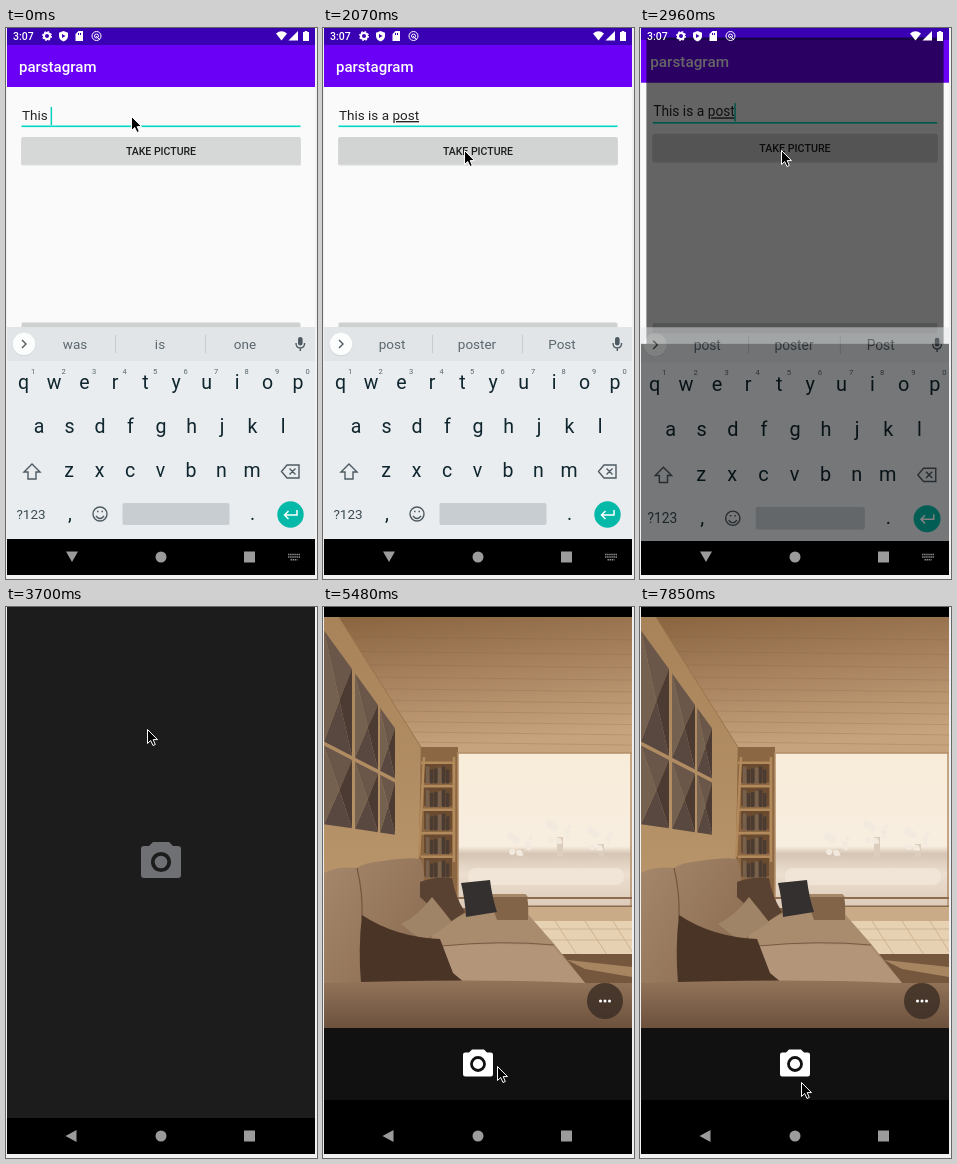
An HTML page that plays this animation: 311x551 px, repeating every 8 s.

```html
<!DOCTYPE html>
<html lang="en">
<head>
<meta charset="utf-8">
<title>Post with a picture</title>
<style>
html, body { margin: 0; width: 100%; height: 100%; overflow: hidden; background: #f1f1f1; }
svg { display: block; width: 311px; height: 551px; }
text { font-family: Roboto, "Noto Sans", sans-serif; white-space: pre; }
.mid { text-anchor: middle; }
.bold { font-weight: 500; }
.key { font-size: 19.5px; fill: #10262e; }
.hint { font-size: 7.5px; fill: #59656c; }
.word { font-size: 13.5px; fill: #5b676e; }
.line { fill: none; stroke: #4e5a61; stroke-width: 1.4; }
#typing { text-decoration: underline; }
</style>
</head>
<body>
<svg viewBox="0 0 311 551">
<defs>
  <clipPath id="screen"><rect x="1" width="308" height="547"/></clipPath>
  <clipPath id="view"><rect x="1" y="10" width="308" height="411"/></clipPath>
  <linearGradient id="ceil" x1="0" y1="0" x2=".25" y2="1">
    <stop offset="0" stop-color="#89643f"/><stop offset=".5" stop-color="#a98360"/><stop offset="1" stop-color="#c6a37c"/>
  </linearGradient>
  <linearGradient id="wall" x2="0" y2="1">
    <stop offset="0" stop-color="#a8835a"/><stop offset="1" stop-color="#b8946b"/>
  </linearGradient>
  <linearGradient id="glass" x2="0" y2="1">
    <stop offset="0" stop-color="#f8ecd9"/><stop offset=".6" stop-color="#f8eee0"/>
    <stop offset=".65" stop-color="#d6c5b4"/><stop offset=".78" stop-color="#ecdfd0"/><stop offset="1" stop-color="#dccab8"/>
  </linearGradient>
  <linearGradient id="back" x2="1" y2=".6">
    <stop offset="0" stop-color="#a5876b"/><stop offset="1" stop-color="#8a6b51"/>
  </linearGradient>
  <linearGradient id="front" x2="0" y2="1">
    <stop offset="0" stop-color="#927459"/><stop offset="1" stop-color="#6c513d"/>
  </linearGradient>
  <path id="cam" d="M12 0H28L32 4H37Q40 4 40 7V33Q40 36 37 36H3Q0 36 0 33V7Q0 4 3 4H8Z"/>
</defs>
<g clip-path="url(#screen)">
  <rect width="311" height="547" fill="#000"/>
  <g id="phone">
    <g id="app">
      <rect x="-5" y="-5" width="321" height="320" fill="#fafafa"/>
      <rect x="-5" y="-5" width="321" height="64" fill="#6a00f6"/>
      <rect x="-5" y="-5" width="321" height="22" fill="#3a00b3"/>
      <text class="bold" x="13" y="44" font-size="15" fill="#fff">parstagram</text>
      <text x="16" y="92" font-size="13.5" fill="#242424" id="field"><tspan id="typed"></tspan><tspan id="typing"></tspan></text>
      <rect id="caret" y="79" width="1.5" height="18" fill="#03d0bd"/>
      <rect x="15.500" y="97.500" width="279" height="1.600" fill="#03d8c4"/>
      <rect x="15" y="109.500" width="280" height="28" rx="2" fill="#000" opacity=".13"/>
      <rect x="15.500" y="109" width="279" height="27" rx="1.500" fill="#d6d7d7"/>
      <rect id="press" x="15.500" y="109" width="279" height="27" rx="1.500"/>
      <text class="mid bold" x="155" y="126.700" font-size="10.5" fill="#1d1d1d">TAKE PICTURE</text>
      <rect x="15.500" y="294.500" width="279" height="10" rx="1.500" fill="#cfd0d0"/>
    </g>
    <g id="opening"><rect x="1" width="308" height="547" id="cover"/></g>
    <g id="board">
      <rect x="-5" y="299" width="321" height="212" fill="#e9edf0"/>
      <rect x="-5" y="299" width="321" height="34" fill="#e1e5e8"/>
      <circle cx="18" cy="316.500" r="11.500" fill="#c9cfd3"/>
      <circle cx="18" cy="316" r="11.300" fill="#fcfdfd"/>
      <path class="line" d="M16 312l4 4-4 4"/>
      <path d="M109.500 307v18M199.500 307v18" stroke="#c5cbcf"/>
      <g id="words"></g>
      <rect x="292" y="309" width="4.600" height="8.600" rx="2.300" fill="#4e5a61"/>
      <path class="line" d="M290 315q0 5 4.300 5t4.300-5M294.300 320v3"/>
      <g id="keys"></g>
      <path class="line" d="M26 436l-8 8h4v7h8v-7h4z"/>
      <path class="line" d="M281 437h12v13h-12l-5.500-6.500zM283.500 440.500l6 6M289.500 440.500l-6 6"/>
      <text class="mid" x="25" y="491" font-size="13.5" fill="#3c4a52">?123</text>
      <g class="line"><circle cx="94" cy="486" r="7"/><path d="M90 488q4 5 8 0M91 483.500h1.500M95.500 483.500h1.500"/></g>
      <rect x="116.500" y="475" width="107" height="22" rx="2" fill="#c8cdd1"/>
      <circle cx="284.500" cy="486.500" r="13.200" fill="#04b9a8"/>
      <path d="M291 482v5h-12M282.500 483l-4 4 4 4" fill="none" stroke="#fff" stroke-width="1.500"/>
    </g>
  </g>
  <g id="status" fill="#fff">
    <text class="bold" x="7" y="12" font-size="10.5">3:07</text>
    <circle cx="41" cy="8" r="3" fill="none" stroke="#fff" stroke-width="2"/>
    <circle cx="41" cy="8" r="4.300" fill="none" stroke="#fff" stroke-width="1.300" stroke-dasharray="1.700 1.677"/>
    <path d="M57.500 3l4.500 1.700v3.300q0 3.600-4.500 5.500q-4.500-1.900-4.500-5.500v-3.300z"/>
    <path d="M56 6l3.500 2-3.500 2z" fill="#3a00b3"/>
    <path d="M72.500 3h4.500v10h-7.500v-7z"/>
    <path d="M72.500 5v2M74.500 5v2" stroke="#3a00b3"/>
    <circle cx="90.500" cy="8" r="4.500" fill="none" stroke="#fff"/>
    <circle cx="90.500" cy="8" r="2" fill="none" stroke="#fff"/><path d="M90 8l4 4" stroke="#fff"/>
    <path d="M270 5.500q5.500-4.500 11 0l-5.500 7z"/><path d="M292 3v9.500h-9.500z"/>
    <path d="M297 4h1.700v-1h2.600v1h1.700v9h-6z"/>
  </g>

  <g id="loading" opacity="0">
    <rect width="311" height="511" fill="#1c1c1c"/>
    <g id="badge">
      <use href="#cam" x="135" y="235" fill="#6f7073"/>
      <circle cx="155" cy="255" r="8.200" fill="none" stroke="#1c1c1c" stroke-width="3.800"/>
    </g>
  </g>

  <g id="camera" opacity="0">
    <rect width="311" height="511"/>
    <g clip-path="url(#view)" id="photo">
      <rect y="10" width="311" height="411" fill="#8b6a4c"/>
      <path d="M16 10H309V146H133L98 140Z" fill="url(#ceil)"/>
      <g id="planks" stroke="#7d5a3a" stroke-opacity=".22"></g>
      <path d="M1 10H16L98 140V275H1Z" fill="url(#wall)"/>
      <path d="M16 10L98 140V252" fill="none" stroke="#8d693f" stroke-opacity=".5"/>
      <g id="panels"></g>
      <path d="M98 140H135V290H95Z" fill="#8c6743"/>
      <g id="shelf"></g>
      <rect x="135" y="146" width="174" height="155" fill="url(#glass)"/>
      <path d="M135 300V146H309M308 146v154" fill="none" stroke="#b28f69" stroke-width="1.500"/>
      <g id="trees" fill="#f3eadf"></g>
      <rect x="145" y="261" width="156" height="17" rx="8" fill="#f3e8da" opacity=".8"/>
      <path d="M135 291h174M200 299.500h109" stroke="#8e6c50" stroke-width="1.800"/>
      <path d="M200 300H309V314H200Z" fill="#c9ab88"/>
      <path d="M200 314H309V348H232Z" fill="#e6d1b2"/>
      <path d="M206 322H309M214 333H309M232 314l22 34M262 314l22 34M290 314l20 32" stroke="#c8ad8b" stroke-width=".8"/>
      <path d="M225 347H309V376H240Z" fill="#75573e"/>
      <path d="M244 353L309 360V370L262 362Z" fill="#a78561"/>
      <path d="M1 266Q15 259 34 261Q40 256 60 254Q85 250 97 252Q101 256 101 275L130 330L60 376H1Z" fill="url(#back)"/>
      <path d="M34 261Q40 285 39 312" fill="none" stroke="#73573f" stroke-width="1.200"/>
      <path d="M110 322L145 305H203L232 338L262 376H100Z" fill="#a98b6e"/>
      <path d="M118 339Q180 335 230 339L262 376H128Z" fill="#b3957a"/>
      <path d="M118 339Q180 333 231 338" fill="none" stroke="#775b44"/>
      <path d="M165 287H202Q206 288 205 313H174Z" fill="#826549"/>
      <path d="M165 287H202L205 290H168Z" fill="#a58868"/>
      <path d="M97 275Q112 269 129 271Q132 290 142 305L126 316Q108 300 97 290Z" fill="#594231"/>
      <path d="M138 276L167 273Q169 290 174 305L143 310Q142 292 138 276Z" fill="#34302f"/>
      <path d="M109 290Q119 302 129 315L101 334Q88 326 78 317Q96 308 109 290Z" fill="#a08467"/>
      <path d="M39 308Q72 330 117 332L130 366L142 376H38Q35 341 39 308Z" fill="#4a3425"/>
      <path d="M1 376Q150 371 258 376H309V421H1Z" fill="url(#front)"/>
    </g>
    <circle cx="282" cy="394" r="18" fill="#3b2d24" opacity=".82"/>
    <path d="M277.500 394h0M282 394h0M286.500 394h0" stroke="#fff" stroke-width="3" stroke-linecap="round"/>
    <rect y="421" width="311" height="72" fill="#111"/>
    <use href="#cam" fill="#fff" transform="translate(140 442.500) scale(.75)"/>
    <circle cx="155" cy="457" r="6.500" fill="none" stroke="#111" stroke-width="2.800"/>
  </g>

  <rect y="513" width="311" height="34"/>
  <g fill="#9b9b9b">
    <path id="hide" d="M60 523.500H72L66 534Z"/>
    <path id="prev" d="M70.500 523V535L59.500 529Z"/>
    <circle cx="155" cy="529" r="5.500"/><rect x="238" y="523.500" width="11" height="11"/>
    <path id="swap" d="M282 526.500h12M282 529h12M284.500 531.700h7" stroke="#8b8b8b" stroke-width="1.500" stroke-dasharray="1.500 .6"/>
  </g>
</g>
<path id="arrow" d="M.5 .5V14.500L3.700 11.500L6 16.500L8.300 15.500L6.200 10.600H10.500Z" stroke="#fff"/>
</svg>

<script>
(() => {
const LOOP = 8000;
const $ = id => document.getElementById(id);

function add(parent, tag, attrs, label) {
  const el = document.createElementNS('http://www.w3.org/2000/svg', tag);
  for (const name in attrs) el.setAttribute(name, attrs[name]);
  if (label) el.textContent = label;
  return $(parent).appendChild(el);
}

// Keyboard
const pitch = 30.5;
[['qwertyuiop', 17.5, 361], ['asdfghjkl', 33, 405], ['zxcvbnm', 63, 449]].forEach(([row, x0, y], r) => {
  [...row].forEach((ch, i) => {
    const x = x0 + i * pitch;
    add('keys', 'text', { class: 'mid key', x, y }, ch);
    if (!r) add('keys', 'text', { class: 'mid hint', x: x + 9.5, y: 346 }, String((i + 1) % 10));
  });
});
[[',', 64], ['.', 246.5]].forEach(([ch, x]) => add('keys', 'text', { class: 'mid key', x, y: 492 }, ch));
const words = [69, 154, 239].map(x => add('words', 'text', { class: 'mid word', x, y: 321 }));

// Room details
for (let i = 1; i < 11; i++) {
  const y = 10 + 135 * (i / 11) ** .8;
  add('planks', 'path', { d: `M${16 + (y - 10) * .63} ${y}L309 ${y + 3}` });
}
const upper = x => 22 + x * 1.38, middle = x => 136 + x * .52, lower = x => 217 + x * .15;
function panel([a, b], up, down) {
  const mx = a + (b - a) * .55, my = (up(mx) + down(mx)) / 2;
  const corners = [[a, up(a)], [b, up(b)], [b, down(b)], [a, down(a)]];
  ['#6a574a', '#4b3b32', '#594840', '#75614f'].forEach((fill, i) =>
    add('panels', 'path', { fill, d: `M${corners[i]}L${corners[(i + 1) % 4]}L${mx} ${my}Z` }));
}
[[1, 29], [32, 55], [57, 72]].forEach(edges => {
  panel(edges, upper, x => middle(x) - 2);
  panel(edges, x => middle(x) + 2, lower);
});
for (let i = 0; i < 5; i++) {
  const y = 178 + (i - 1) * 23.5;
  add('shelf', 'rect', { x: 101, y: y + 1, width: 28, height: 20, fill: '#6b4b30' });
  for (let k = 0; k < 6; k++) {
    const gap = k * 7 % 4;
    add('shelf', 'rect', { x: 103 + k * 4, y: y + 5 + gap, width: 3.3, height: 17 - gap, fill: k % 3 ? '#4b3c33' : '#76614e' });
  }
  add('shelf', 'rect', { x: 98, y, width: 34, height: 2.5, fill: '#b38a5c' });
}
add('shelf', 'path', { d: 'M101 150L96 250M131 150V255', stroke: '#b38a5c', 'stroke-width': 2.5 });
[[198, 238], [237, 226], [278, 233]].forEach(([x, y]) => {
  add('trees', 'rect', { x: x - 3, y: y + 4, width: 6, height: 246 - y, fill: '#dccdbd' });
  for (let k = 0; k < 8; k++)
    add('trees', 'circle', { cx: x + 10 * Math.sin(k * 2.4), cy: y + 9 * Math.cos(k * 1.7), r: 2 + k % 3 });
});

// Steps: time first, then the state held until the next row
const typing = [
  [0, 'This ', '', 'was is one'],
  [150, 'This ', 'is', 'is us isn’t'],
  [290, 'This is ', '', 'the a not'],
  [590, 'This is ', 'a', 'a as and'],
  [890, 'This is a ', '', 'good new great'],
  [1030, 'This is a ', 'p', 'p people P'],
  [1180, 'This is a ', 'pos', 'pos post Pos'],
  [1320, 'This is a ', 'post', 'post poster Post']
];
const caret = [[0, 1], [1920, 0], [2360, 1]];
const press = [[0, 0], [2070, .02], [2210, .08], [2360, .1], [2510, .01]];
// time, app scale, cover scale, cover opacity, keyboard opacity
const launch = [[0, 1, .88, 0, 1], [2810, 1.009, .883, .08, 1], [2960, 1.02, .965, .6, .5], [3110, 1, 1, 1, 0]];
// time, loading screen, badge, camera screen, photo
const stages = [[0, 0, 0, 0, 0], [3550, 1, .4, 0, 0], [3700, 1, 1, 0, 0], [3840, 1, 1, 1, .5], [3990, 1, 1, 1, 1]];
const pointer = [
  [0, 125, 88], [1620, 127, 93], [1770, 133, 108], [1920, 140, 121], [2070, 141, 122],
  [4290, 140, 160], [4440, 136, 270], [4590, 135, 390], [4730, 140, 464], [4880, 144, 460],
  [5480, 174, 459], [5620, 219, 451], [5770, 235, 448], [6070, 233, 448],
  [6520, 230, 441], [6670, 222, 430], [6810, 212, 425], [6960, 201, 432],
  [7110, 190, 445], [7250, 180, 457], [7400, 172, 462], [7550, 168, 463],
  [7700, 164, 470], [7850, 161, 475]
];
const at = (rows, t) => rows.filter(row => row[0] <= t).pop().slice(1);
const about = s => `translate(155 273) scale(${s}) translate(-155 -273)`;
const show = (id, o) => $(id).setAttribute('opacity', o);

function render(t) {
  const [before, current, options] = at(typing, t);
  $('typed').textContent = before;
  $('typing').textContent = current;
  options.split(' ').forEach((word, i) => words[i].textContent = word);
  $('caret').setAttribute('x', 15.5 + $('field').getComputedTextLength());
  show('caret', at(caret, t)[0]);
  show('press', at(press, t)[0]);

  const [zoom, grow, dark, board] = at(launch, t);
  $('app').setAttribute('transform', about(zoom));
  $('board').setAttribute('transform', about(zoom));
  $('opening').setAttribute('transform', about(grow));
  show('cover', dark);
  show('board', board);

  const left = t >= 3110;
  ['status', 'hide', 'swap'].forEach(id => show(id, left ? 0 : 1));
  show('prev', left ? 1 : 0);

  const shown = at(stages, t);
  ['loading', 'badge', 'camera', 'photo'].forEach((id, i) => show(id, shown[i]));
  $('arrow').setAttribute('transform', `translate(${at(pointer, t)})`);
}

const start = performance.now();
function tick() {
  render((performance.now() - start) % LOOP);
  requestAnimationFrame(tick);
}
tick();
})();
</script>
</body>
</html>
```
